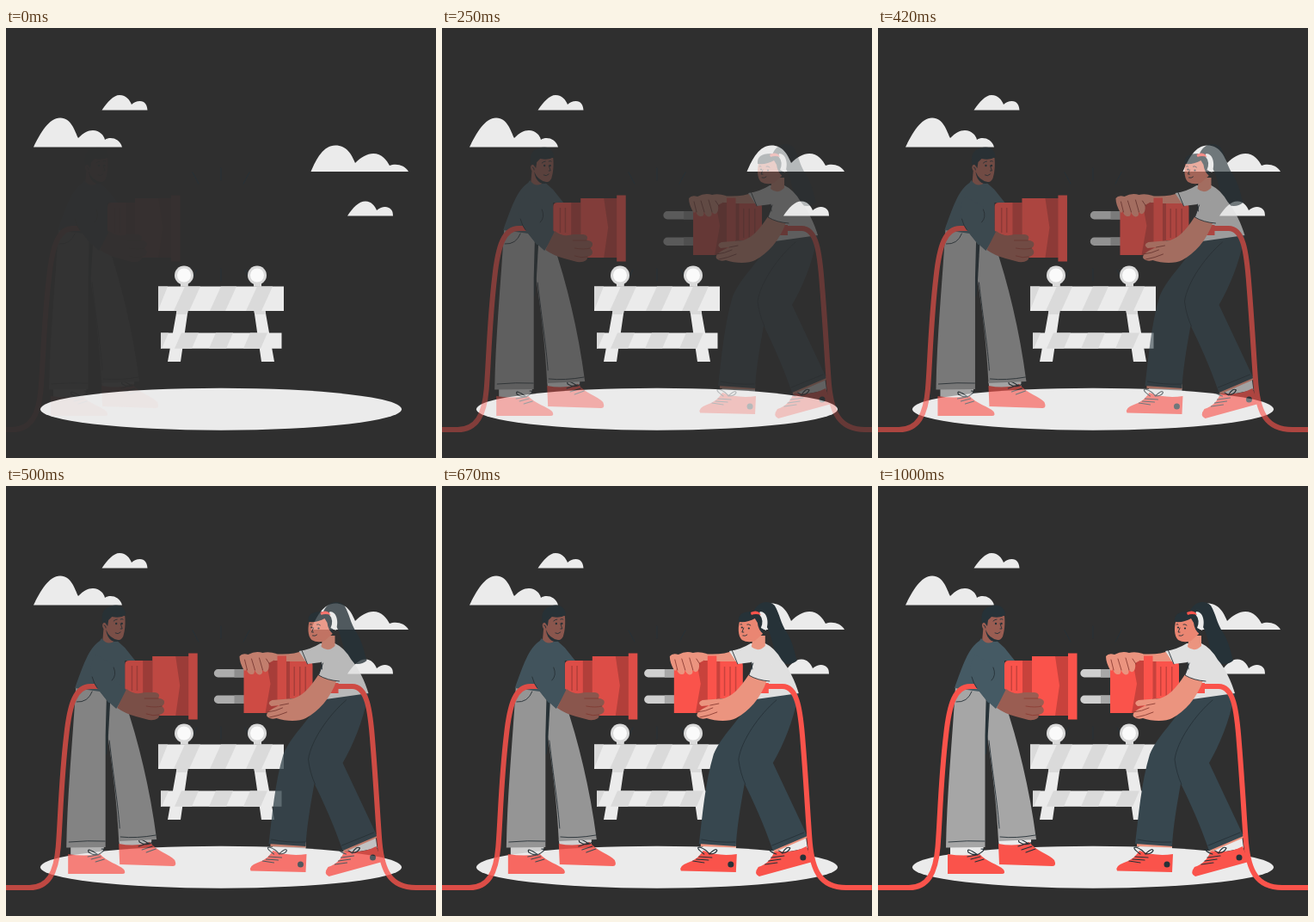
Write an HTML page that moves like this. It is 500x500 px and loops after 1040 ms.

```html
<!DOCTYPE html>
<html lang="en">
<head>
<meta charset="utf-8">
<title>Plug and socket</title>
<style>
html, body { margin: 0; width: 100%; height: 100%; overflow: hidden; background: #2f2f2f }
svg { display: block; width: 100vw; height: 100vh }
.light { fill: #ebebeb } .shade { fill: #dadada } .shirt { fill: #e0e0e0 }
.red { fill: #fa534b } .dark { fill: #c8423c }
.navy { fill: #263238 } .top { fill: #455a64 } .jeans { fill: #37474f }
.gray { fill: #a6a6a6 } .brown { fill: #9a5d52 } .peach { fill: #eb947f }
.line { fill: none; stroke: #263238; stroke-width: .9; stroke-linecap: round; stroke-linejoin: round }
.lace { stroke-width: 1.2 }
.cable { fill: none; stroke: #fa534b; stroke-width: 6 }
.crease { fill: none; stroke: #8d3e35; stroke-width: .9; stroke-linecap: round }
</style>
</head>
<body>
<svg viewBox="0 0 500 500">
<!-- Scenery -->
<path class="line" d="M250 163V177M217 168L224 181M283 168L276 181M250 280V294M222 281L217 291M278 281L283 291"/>
<g class="light">
  <path d="M32 138.400C40 122 50 104.500 63 104.500C76 104.500 80 120 84 128C90 122 95 119 101 119C109 119 114 125 115 130C121 126 132 128 135 138.400Z"/>
  <path d="M111.500 95.400C118 86 125 78 132 78C140 78 144 84 146 89C150 85 156 84 160 86C163 88 164 91 164.500 95.400Z"/>
  <path d="M354.500 167C361 152 369 136.500 383 136.500C396 136.500 402 147 406 157C413 150 420 146 427 146C437 146 443 154 446 160C453 157 464 159 468 167Z"/>
  <path d="M397 218.600C403 209 410 201.500 418 201.500C425 201.500 429 207 431 212C436 208 441 207 445 209C449 211 450 214 450 218.600Z"/>
  <ellipse cx="250" cy="443.200" rx="210" ry="24.500"/>
  <path d="M203 296h8.500v4.500H203ZM288 296h9v4.500H288ZM198.500 329H211.500L203 388H188ZM288.500 329H301.500L312 388H297Z"/>
  <path d="M177 300.500H323V329H177ZM180 354.500H320.500V372.700H180Z"/>
</g>
<g class="shade">
  <path d="M203 296h8.500v4.500H203ZM288 296h9v4.500H288ZM198.500 329h13l-.6 4H197.800ZM288.500 329h13l.7 4H289.100Z"/>
  <path d="M177 300.500h11L177 328ZM208 300.500h18L213 329H195ZM250 300.500h18L255 329H237ZM292 300.500h18L297 329H279Z"/>
  <path d="M180 354.500h9L181 372.700H180ZM204 354.500h20L216 372.700H196ZM244 354.500h20L256 372.700H236ZM284 354.500h20L296 372.700H276Z"/>
  <circle cx="207" cy="287.500" r="11"/><circle cx="292" cy="287.500" r="11"/>
</g>
<g fill="#fafafa"><circle cx="207" cy="287.500" r="8"/><circle cx="292" cy="287.500" r="8"/></g>

<g id="man">
  <!-- Shoes and trousers -->
  <path class="light" d="M84 418H123L121 430H84ZM140 411H178V418L141 420Z"/>
  <path class="red" d="M81 428Q100 431 118 428C126 437 140 440 146 446Q149 451 144 451H81ZM140 416Q160 420 176 414C183 424 200 429 205 435Q208 442 203 442L141 440Z"/>
  <path class="line lace" d="M104 431l11-2M108 434l11-3M113 437l10-3M116 429q-14-10-11-3q6 4 12 2q10-6 3-6M163 419l12-4M167 423l12-4M172 426l11-4M175 416q-14-9-11-2q6 4 12 2q9-6 4-6"/>
  <path class="gray" d="M128 250H147C163 298 176 350 184 411L140 413C138 370 133 330 127 290Z"/>
  <path class="navy" d="M124 250H130L127.500 294L126 312H124Z"/>
  <path class="gray" d="M90 234H126L124.500 290V420L79 420.500C80 360 86 300 90 234Z"/>
  <path class="line" d="M82 414Q104 412 124 413M142 408Q160 410 183 406M109 239Q104 252 91 251M129 296C134 340 139 370 141 398"/>
  <!-- Socket -->
  <path class="red" d="M179 203H152Q147 203 147 208V238L160 245H179Z"/>
  <path class="dark" d="M168 203h11v38h-11ZM154.500 209h1.500v29h-1.500ZM160.500 209h1.500v29h-1.500Z"/>
  <path class="red" d="M179 198H221V194.500H231.500V271.500H221V267H179Z"/>
  <path class="dark" d="M206 198H221V267H206L211 232Z"/>
  <!-- Shirt and cable -->
  <path class="brown" d="M123 158H134V181L129 187L121 181Z"/>
  <path class="top" d="M120 177Q127 187 137 179L147 188L159 203H147V238L137 250L128 252L118 239L89 235C98 210 105 188 118 180Z"/>
  <path class="cable" d="M119 233H107C90 233 83 252 79 290C73 340 72 390 69.500 420C67 450 58 467 36 467H-2"/>
  <path class="top" d="M113 196C104 208 107 224 115 235Q124 248 137 259Q144 248 150 238L133 224L134 208Z"/>
  <path class="line" d="M134 211Q138 220 132 226M109 222Q111 230 115 235"/>
  <!-- Hand -->
  <path class="brown" d="M149 236C157 242 163 242 170 240H182Q189 241 186 247C195 247 194 254 190 256C195 260 193 265 187 266Q187 273 175 272L160 268Q148 265 138 258Z"/>
  <path class="crease" d="M170 247H186M172 256Q183 258 190 256M172 265Q180 268 187 266"/>
  <!-- Head -->
  <path class="brown" d="M123 151H147C148 160 147 169 145 175Q142 181 134 179Q127 177 126 168Q120 166 121 161Q122 158 125 159Z"/>
  <path class="navy" d="M121 159C119 148 123 141 131 140C139 136 148 141 148 150Q142 154 132 152L128 156L127 163L124 159Z"/>
  <path class="navy" d="M125 167Q129 177 139 179L143 179Q138 182.500 132 180Q126 176 125 167Z"/>
  <path class="line" d="M134 157q2-2 4-2M142 155q2-1 3 0M142 160l2 6h-2M136 171q3 2 6-1M123 162q2 0 2 3"/>
  <g class="navy"><circle cx="137" cy="160" r="1.200"/><circle cx="143.500" cy="160" r="1.200"/></g>
</g>

<g id="woman">
  <!-- Hair behind -->
  <path class="navy" d="M362 148C366 134 380 132 387 139C393 149 394 160 401 170C408 181 410 193 413 203Q406 209 396 206C384 195 386 178 378 164Z"/>
  <!-- Shoes and trousers -->
  <path class="light" d="M304 414H342V431L303 427ZM385 420L423 406L425 421L388 428Z"/>
  <path class="red" d="M304 424Q322 431 343 428L342 449L278 447.500Q275 442 286 438C295 435 300 430 304 424ZM387 424Q407 428 424 419L431 437L369 454Q362 451 368 443C378 440 384 433 387 424Z"/>
  <path class="navy" d="M332.500 440a3.500 3.500 0 1 0 7 0a3.500 3.500 0 1 0-7 0ZM416.500 432a3.500 3.500 0 1 0 7 0a3.500 3.500 0 1 0-7 0Z"/>
  <path class="line lace" d="M299 431l15 1M296 434l14 1M292 436l13 2M305 428q-11-8-5-8q8 3 11 8q8-8 9-4q-2 4-9 4M383 432l15-2M380 436l14-2M376 440l14-2M389 428q-11-4-6-6q8 0 13 5q5-9 9-6q-2 5-9 6"/>
  <path class="peach" d="M301 415H342V420.500L301 419ZM385 420L425 405V409L386 426Z"/>
  <path class="jeans" d="M360 247L415 241C408 276 397 301 385 322L425 407L385 424C374 392 361 364 352 346C347 374 343 398 342 419L299 416C303 383 306 345 316 312C325 290 347 272 360 247Z"/>
  <path class="line" d="M389 249C369 266 348 296 345 318Q347 334 353 347M302 411Q320 415 341 414M384 418L421 403"/>
  <!-- Far forearm, plug, fingers -->
  <path class="peach" d="M340 191Q326 197 305 195V206H347Z"/>
  <path fill="#d0d0d0" d="M272 213H240a4.700 4.700 0 0 0 0 9.400H272ZM272 243.500H240a4.700 4.700 0 0 0 0 9.400H272Z"/>
  <path fill="#a8a8a8" d="M259 213h13v9.400H259ZM259 243.500h13v9.400H259Z"/>
  <path class="red" d="M270 203H309V197.500H319.500V204H346Q350 204 350 209V247H319.500V265H309V264H270Z"/>
  <path class="dark" d="M296 203H309V264H295L301 230ZM319.500 204h4v46h-4ZM328 210h1.500v34H328ZM334.500 210h1.500v34h-1.500ZM341 210h1.500v34H341Z"/>
  <path class="peach" d="M308 195V201L299 206Q300 214 296 216Q293 217 291 213Q293 219 288 219.500Q284 219 282 212Q284 220 278 219Q274 218 273 212Q273 216 270 214Q265 205 265 198Q268 194 275 196Q284 191 292 194Q299 192 308 195Z"/>
  <path class="crease" d="M271 202L274 214M279 201L283 214M288 200L292 214M296 201L300 207"/>
  <!-- Shirt, near arm and cable -->
  <path class="shirt" d="M359 183Q348 190 334 192L344 207L360 205C365 218 360 235 358 249L415 241C411 228 404 212 395 202Q387 188 376 183Z"/>
  <path class="cable" d="M376 233H396C413 233 417 258 420 300C424 350 426 390 428 415C431 447 440 467 470 467H500"/>
  <path class="red" d="M370 229h10v12h-10Z"/>
  <path class="peach" d="M359 216C350 230 341 243 328 247L303 249Q296 252 302 256L312 255C300 260 295 264 297 268Q301 272 308 270C319 274 335 274 342 270C357 262 370 248 378 226Z"/>
  <path class="crease" d="M297 263Q307 262 315 258M300 269Q311 267 320 263M312 255L322 253"/>
  <path class="shirt" d="M367 194L357 220Q367 226 381 227L388 211Z"/>
  <path class="line" d="M362 206L357 220Q367 226 381 227M360 205l1 8M337 190l7 17"/>
  <!-- Head -->
  <path class="peach" d="M362 174H376V186Q368 194 360 187Z"/>
  <path fill="#ea8672" d="M347 154C344 164 344 174 349 179Q356 183 364 180L373 172V157L361 151Z"/>
  <path class="navy" d="M345 158C344 150 349 146 360 146L374 149V172Q368 168 367 159L364 154Q356 159 345 158Z"/>
  <path class="light" d="M370 146C378 146 381 158 377 168L371 165Q375 156 369 149Z"/>
  <path class="red" d="M359 147Q365 144 369 147L371 150Q365 148 360 150Z"/>
  <path class="line" d="M347 161q1-1 2 0M355 161q2-1 4 1M351 165l-2 5h2M350 174q3 1 5-1"/>
  <g class="navy"><circle cx="349" cy="164.500" r="1.100"/><circle cx="357" cy="165.500" r="1.100"/></g>
</g>
</svg>
<script>
const LOOP = 1040, STEP = 41.6, STEPS = 24;
const man = document.getElementById('man'), woman = document.getElementById('woman');

// Cubic Bezier easing, solved by bisection.
function ease(t, x1, y1, x2, y2) {
  const curve = (s, a, b) => 3 * s * (1 - s) ** 2 * a + 3 * s * s * (1 - s) * b + s ** 3;
  let lo = 0, hi = 1;
  for (let i = 0; i < 24; i++) {
    const mid = (lo + hi) / 2;
    if (curve(mid, x1, x2) < t) lo = mid; else hi = mid;
  }
  return curve(hi, y1, y2);
}

function slide(group, progress, distance) {
  group.setAttribute('transform', `translate(${distance * (1 - progress)} 0)`);
  group.setAttribute('opacity', Math.max(0, Math.min(1, progress)));
}

function draw(now) {
  const step = Math.floor((now % LOOP) / STEP + 0.1);
  const t = Math.min(1, (step + 0.5) / STEPS);
  slide(man, ease(t, 0, 0, 0.58, 1), -30);
  slide(woman, ease(t, 0.36, -0.01, 0.5, 1.38), 30);
}

const start = performance.now();
function tick() {
  draw(performance.now() - start);
  requestAnimationFrame(tick);
}
tick();
</script>
</body>
</html>
```
